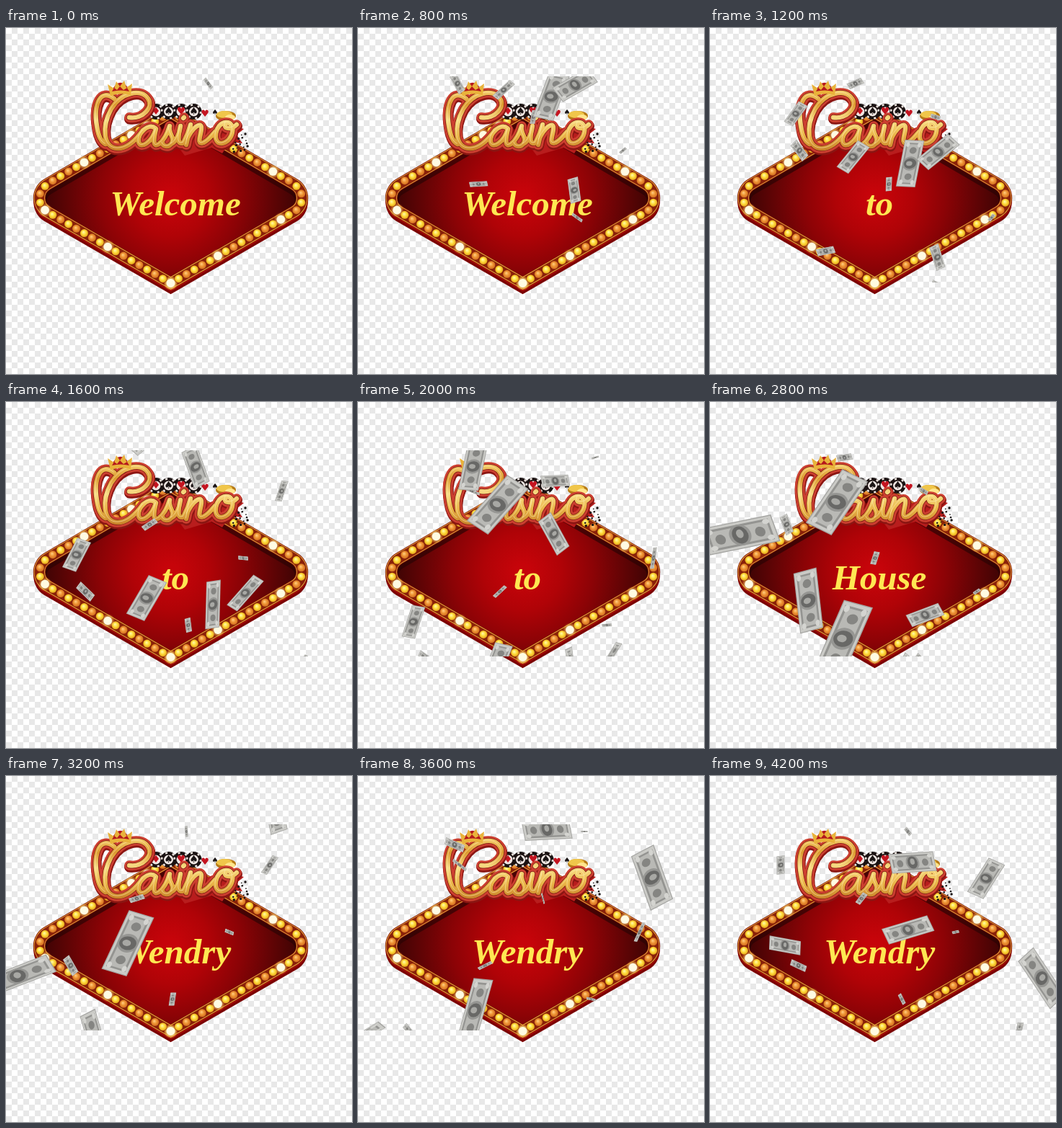
Write an HTML page with a canvas that moves like this. It is 480 by 480 pixels and loops after 4270 ms.

```html
<!DOCTYPE html>
<html lang="en">
<head>
<meta charset="utf-8">
<title>Casino sign</title>
<style>
html, body { margin: 0; width: 100%; height: 100%; overflow: hidden; background: #fff; }
canvas { display: block; width: 480px; height: 480px; }
</style>
</head>
<body>
<canvas id="stage" width="480" height="480"></canvas>
<script>
const SIZE = 480, LOOP = 4270, STEPS = 64, PER_MS = 0.015;
const words = ['Welcome', 'to', 'House', 'Wendry'];
const stage = document.getElementById('stage').getContext('2d');

const scene = document.createElement('canvas');
scene.width = scene.height = SIZE;
const g = scene.getContext('2d');

function oval(c, x, y, rx, ry, fill) {
  c.fillStyle = fill;
  c.beginPath();
  c.ellipse(x, y, rx, ry, 0, 0, Math.PI * 2);
  c.fill();
}

const disc = (x, y, r, fill) => oval(g, x, y, r, r, fill);

function line(path, color, width) {
  g.strokeStyle = color;
  g.lineWidth = width;
  g.stroke(path);
}

function shape(d, color) {
  g.fillStyle = color;
  g.fill(new Path2D(d));
}

function blend(gradient, ...colors) {
  colors.forEach((c, i) => gradient.addColorStop(i / (colors.length - 1), c));
  return gradient;
}

function checker() {
  const cell = 8;
  g.fillStyle = '#fff';
  g.fillRect(0, 0, SIZE, SIZE);
  g.fillStyle = '#e8e8e8';
  for (let j = 0; j * cell < SIZE; j++)
    for (let i = (j + 1) % 2; i * cell < SIZE; i += 2)
      g.fillRect(i * cell, j * cell, cell, cell);
}

// Sign: a diamond with rounded left and right corners
const CX = 228.5, TOP = 117, MID = 236, BOTTOM = 354, HALF = 204, R = 22;

function diamond(dy = 0) {
  const p = new Path2D();
  p.moveTo(CX, BOTTOM + dy);
  p.arcTo(CX + HALF, MID + dy, CX, TOP + dy, R);
  p.lineTo(CX, TOP + dy);
  p.arcTo(CX - HALF, MID + dy, CX, BOTTOM + dy, R);
  p.closePath();
  return p;
}

const slope = Math.atan2(BOTTOM - MID, HALF);
const turn = Math.PI - 2 * slope;
const edge = Math.hypot(HALF, BOTTOM - MID) - R * Math.tan(turn / 2);
const side = 2 * edge + R * turn;

// Point at distance s along one side, from the bottom tip to the top
function along(s) {
  if (s < edge) return [s * Math.cos(slope), BOTTOM - s * Math.sin(slope)];
  if (s > side - edge) {
    const u = side - s;
    return [u * Math.cos(slope), TOP + u * Math.sin(slope)];
  }
  const a = (s - edge) / R - turn / 2;
  return [HALF - R / Math.cos(turn / 2) + R * Math.cos(a), MID - R * Math.sin(a)];
}

function bulb(x, y, lit, odd) {
  if (lit) {
    disc(x, y, 10, blend(g.createRadialGradient(x, y, 2, x, y, 10), '#fffbe0', '#ffe48a90', '#ffb02000'));
    disc(x, y, 5.8, '#fffbe2');
    return;
  }
  disc(x, y, 6, '#8a2c08');
  const glow = g.createRadialGradient(x - 1, y - 1.5, 0.5, x, y, 5.6);
  disc(x, y, 5.5, odd ? blend(glow, '#fff7a0', '#ffdc3c', '#e2a01a') : blend(glow, '#ffc878', '#ee9434', '#d06a20'));
}

function sign() {
  const body = diamond();
  line(diamond(6), '#7c0303', 16);
  line(diamond(2), '#a80a08', 16.5);
  g.fillStyle = blend(g.createRadialGradient(CX, 235, 10, CX, 235, 185), '#c6040a', '#b00307', '#8c0306', '#600405', '#350404');
  g.fill(body);
  g.save();
  g.clip(body);
  line(diamond(5), '#2a0303b0', 20);
  g.restore();
  line(body, '#7a0a06', 17);
  line(body, '#e5a53a', 15.5);
  line(body, '#8a2009', 13.5);

  // a lit bulb every eight, counted from the bottom on the left and from six on the right
  const n = 35;
  for (let i = 0; i <= n; i++) {
    const [x, y] = along(i * side / n);
    bulb(CX - x, y, i % 8 === 0 || i === 30, i % 2);
    bulb(CX + x, y, i % 8 === 6 || i === 0, i % 2);
  }
}

function glyph(ch, x, y, size, color) {
  g.font = size + 'px "DejaVu Sans", sans-serif';
  g.textAlign = 'center';
  g.textBaseline = 'middle';
  g.fillStyle = color;
  g.fillText(ch, x, y);
}

function chip(x, y, suit, color) {
  const rim = new Path2D();
  rim.arc(x, y, 9.5, 0, Math.PI * 2);
  disc(x, y, 11, '#1b1212');
  g.setLineDash([3, 7]);
  line(rim, '#efe6e0', 2.5);
  g.setLineDash([]);
  disc(x, y, 6.5, '#f0e6e2');
  glyph(suit, x, y, 14, color);
}

function trimmings() {
  const black = '#1b1515', red = '#c41420';
  [...'♦♠♥♠'].forEach((suit, i) => chip(208 + i * 17.5, 116, suit, i % 2 ? black : red));
  glyph('♥', 276, 120, 13, red);
  glyph('♠', 290, 117, 10, black);
  shape('M300 132L330 140L320 148L328 160L310 158L300 174L285 166L248 177L235 160Z', '#b81d1d');
  // scattered dots
  for (let i = 0; i < 22; i++)
    disc(311 + (i * 7.3) % 25, 147 + (i * 11.7) % 26, 0.9 + i % 3 * 0.4, black);
  // gold heap
  oval(g, 305, 122, 14, 7, '#b77a16');
  oval(g, 303, 120, 11, 5, '#f0c64a');
  oval(g, 311, 124, 7, 4, '#ffe58c');
}

function lettering() {
  const p = new Path2D(
    'M171 124C190 127 205 109 197 98C188 84 161 88 146 112C132 138 135 167 155 167C170 167 182 153 190 142' +
    'M150 98C131 83 121 106 126 136C128 150 132 158 138 161' +
    'M207 139C198 131 182 146 184 158C186 168 202 160 208 140C204 156 204 166 212 161' +
    'C219 156 224 146 227 136C224 146 236 152 229 161C225 166 217 164 217 159' +
    'M229 161C236 158 241 146 242 136C238 152 238 163 246 159M246 125L247 124' +
    'M246 159C251 150 254 142 256 134L250 162M251 155C258 138 272 128 271 140' +
    'C270 150 264 162 274 159C282 155 286 148 290 144' +
    'M305 131C290 132 285 160 299 160C316 158 320 130 305 131C300 140 312 142 320 134');
  const gold = blend(g.createLinearGradient(0, 85, 0, 170), '#f6d272', '#dc9a30', '#f8dc84', '#eab548', '#c8822a');
  g.lineCap = g.lineJoin = 'round';
  g.save();
  g.translate(0.5, 2);
  line(p, '#8b1512', 15);
  g.restore();
  line(p, '#cc3f30', 13.5);
  line(p, '#7d1a10', 8);
  line(p, gold, 6.5);
  g.translate(-0.8, -0.8);
  line(p, '#fff2b890', 1);
  g.translate(0.8, 0.8);
}

function crown() {
  shape('M146 88Q158 64 172 87Z', '#b5181c');
  shape('M145 94L141 78L150 84L153 74L158 81L164 73L167 83L175 77L173 93Q159 89 145 94Z', '#e9b23a');
  shape('M147 88L150 83L154 86L158 81L163 86L168 83L171 88Q159 85 147 88Z', '#b5181c');
}

checker();
sign();
trimmings();
lettering();
crown();

// Falling money: one key pose for each large bill, the rest follows from fall()
const large = [
  { at: 12, x: 268, y: 95, w: 66, deg: -72 },
  { at: 12, x: 301, y: 79, w: 56, deg: -32 },
  { at: 12, x: 300, y: 225, w: 34, deg: 80 },
  { at: 24, x: 195, y: 272, w: 62, deg: -62 },
  { at: 24, x: 263, y: 90, w: 54, deg: 68 },
  { at: 24, x: 98, y: 212, w: 46, deg: -65 },
  { at: 35, x: 72, y: 76, w: 100, deg: -3 },
  { at: 35, x: 150, y: 167, w: 84, deg: -88 },
  { at: 35, x: 190, y: 220, w: 106, deg: -58 },
  { at: 35, x: 284, y: 187, w: 48, deg: -12 },
  { at: 42, x: 176, y: 139, w: 90, deg: -58 },
  { at: 54, x: 408, y: 141, w: 80, deg: 68 },
  { at: 54, x: 262, y: 74, w: 66, deg: -5 },
  { at: 63, x: 281, y: 120, w: 62, deg: -6 },
  { at: 63, x: 383, y: 142, w: 56, deg: -60 },
  { at: 63, x: 104, y: 235, w: 44, deg: 8 }
];

// Small scraps enter at the top one after another
const small = Array.from({ length: 22 }, (_, i) => ({
  at: i * 3,
  x: 105 + (i * 0.618 + 0.65) % 1 * 270,
  y: 77,
  w: 8 + (i * 0.37 + 0.4) % 1 * 22,
  deg: (i * 137 + 52) % 180,
  phase: 1 + i * 0.4
}));

// Bills drop evenly, drift out from the middle, grow as they come near and tumble
function fall({ at, x, y, w, deg, phase = 0 }, step) {
  const dt = step - at;
  const grow = Math.min(1, Math.max(0.4, 1 + 0.04 * dt));
  const flip = 0.25 + 0.75 * Math.abs(Math.cos(phase + 0.08 * dt));
  drawBill(x + (x - 215) * 0.03 * dt, y + 15.5 * dt, w * grow, w * grow * 0.44 * flip, deg - 1.5 * dt);
}

function drawBill(x, y, w, h, deg) {
  const c = stage;
  const box = (bw, bh, color) => {
    c.fillStyle = color;
    c.fillRect(-bw / 2, -bh / 2, bw, bh);
  };
  c.save();
  c.translate(x, y);
  c.rotate(deg * Math.PI / 180);
  c.transform(w / 100, 0.04 * h / 44, 0.1 * w / 100, h / 44, 0, 0);
  box(100, 44, '#a5a5a2');
  box(97, 41, '#cbcbc7');
  box(88, 34, '#949491');
  box(82, 27, '#b9b9b5');
  oval(c, 0, 0, 15, 17, '#969693');
  oval(c, 0, 0, 11, 14, '#686866');
  oval(c, 0, -2, 5, 7, '#a8a8a4');
  for (const sx of [-1, 1]) {
    oval(c, sx * 28, 1, 7, 8, '#858582');
    for (const sy of [-1, 1]) oval(c, sx * 40, sy * 13, 5, 4, '#d4d4d0');
  }
  c.restore();
}

function draw(ms) {
  const step = Math.min(STEPS - 1, Math.floor((ms % LOOP) * PER_MS + 0.06));
  stage.drawImage(scene, 0, 0);

  stage.font = 'italic bold 49px "Liberation Serif", "Times New Roman", serif';
  stage.textAlign = 'center';
  stage.fillStyle = '#ffe752';
  stage.fillText(words[Math.floor(step * words.length / STEPS)], 235, 260);

  stage.save();
  stage.beginPath();
  stage.rect(0, 67, SIZE, 286);
  stage.clip();
  for (const b of small) if (step >= b.at) fall(b, step);
  for (const b of large) fall(b, step);
  stage.restore();
}

const start = performance.now();
function tick() {
  draw(performance.now() - start);
  requestAnimationFrame(tick);
}
tick();
</script>
</body>
</html>
```
